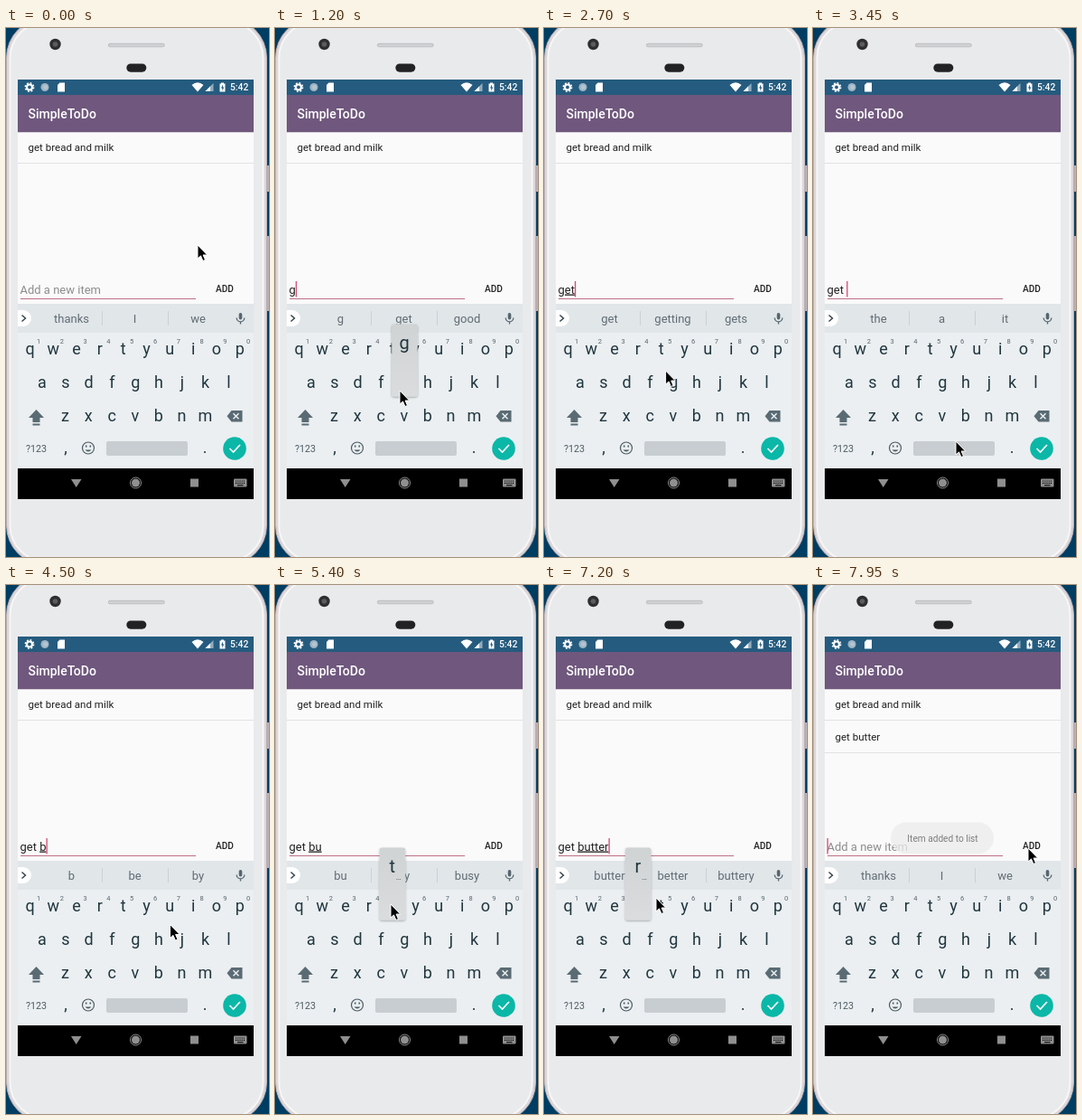
Recreate the animation shown at these times as an HTML page. Size 291 by 585 pixels, loop 8000 ms.

```html
<!DOCTYPE html>
<html lang="en">
<head>
<meta charset="utf-8">
<title>To-do list typing</title>
<style>
  html, body { margin: 0; height: 100%; overflow: hidden; background: #003d62; }
  svg { display: block; width: 100vw; height: 100vh; font-family: Roboto, sans-serif; }
  text { white-space: pre; }
  .mid { text-anchor: middle; }
  .item { font-size: 11.55px; fill: #222; }
  .field { font-size: 13px; }
  .key { font-size: 18px; fill: #20363f; text-anchor: middle; }
  .digit { font-size: 7.5px; fill: #56656c; text-anchor: middle; }
  #word { text-decoration: underline; }
</style>
</head>
<body>
<svg viewBox="0 0 291 585">
  <defs>
    <linearGradient id="popFill" x2="0" y2="1">
      <stop stop-color="#d0d3d4"/><stop offset="1" stop-color="#dadcdd"/>
    </linearGradient>
    <filter id="soft" x="-30%" y="-30%" width="160%" height="160%">
      <feDropShadow dx="0" dy="1" stdDeviation="1" flood-opacity=".35"/>
    </filter>
  </defs>

  <!-- phone body -->
  <rect width="291" height="585" fill="#003d62"/>
  <path d="M288 152h3v29h-3zM288 230h3v83h-3z" fill="#b9b0b5"/>
  <rect x=".5" y="-11" width="288" height="605" rx="44" fill="#dcd6d9" stroke="#b3abb0"/>
  <rect x="4.500" y="-7" width="280" height="597" rx="40" fill="#e9eaec" stroke="#f7f6f7" stroke-width="2"/>
  <circle cx="54.500" cy="18" r="6.200" fill="#2e2e30"/>
  <circle cx="54.500" cy="18" r="2.800" fill="#5c5c60"/>
  <rect x="113.300" y="17.300" width="62" height="3.500" rx="1.700" fill="#d2d2d5" stroke="#b0b0b4" stroke-width=".7"/>
  <rect x="133.300" y="39.500" width="22" height="9.200" rx="4.600" fill="#222224"/>

  <!-- status bar -->
  <rect x="13" y="57" width="261" height="464" fill="#fafafa"/>
  <rect x="13" y="57" width="261" height="17" fill="#255b7e"/>
  <g fill="#fff">
    <circle cx="26" cy="65.500" r="3" fill="none" stroke="#fff" stroke-width="2.200"/>
    <circle cx="26" cy="65.500" r="4.700" fill="none" stroke="#fff" stroke-width="1.500" stroke-dasharray="1.9 1.79"/>
    <circle cx="43" cy="65.500" r="4.500" fill="#9db4c3"/>
    <circle cx="43.500" cy="65.500" r="2.500" fill="#b4c6d1"/>
    <path d="M59.500 60.500H65V70.500H57V63z"/>
    <path d="M205.500 63Q212 57.500 218.500 63L212 70.500z"/>
    <path d="M229.500 61V70H220.500z" opacity=".5"/>
    <path d="M226 64.500V70H220.500z"/>
    <path d="M236.500 61.500H238V60.500H241V61.500H242.500V70.500H236.500z"/>
    <path d="M240 62.500L238 66.500H239.300V69.500L241.300 65.500H240z" fill="#255b7e"/>
    <text x="248" y="69" font-size="10.300" font-weight="500">5:42</text>
  </g>

  <!-- app -->
  <rect x="13" y="74" width="261" height="41" fill="#6f577d"/>
  <rect x="13" y="115" width="261" height="1" fill="#d6d0d8"/>
  <text x="24.500" y="100" font-size="14" font-weight="500" fill="#fff">SimpleToDo</text>
  <text class="item" x="24.500" y="136">get bread and milk</text>
  <path d="M13 149.500H274" stroke="#e2e2e2"/>
  <g id="added">
    <text class="item" x="24.500" y="171.500">get butter</text>
    <path d="M13 185.500H274" stroke="#e2e2e2"/>
  </g>
  <path d="M16 299.500H210" stroke="#bd6f84"/>
  <text id="hint" class="field" x="15.500" y="293.500" fill="#8d8d8d">Add a new item</text>
  <text id="entry" class="field" x="15.500" y="293.500" fill="#222"><tspan id="done"></tspan><tspan id="word"></tspan></text>
  <rect id="caret" y="280" width="1.300" height="17.500" fill="#d6486f"/>
  <text class="mid" x="242" y="291.500" font-size="10.150" font-weight="500" fill="#222">ADD</text>

  <!-- keyboard -->
  <rect x="13" y="305" width="261" height="182" fill="#ebeff1"/>
  <rect x="13" y="305" width="261" height="32" fill="#e1e6e9"/>
  <path d="M13 312H19A9 9 0 0 1 19 330H13z" fill="#fff"/>
  <path d="M17.500 317.500L21.500 321L17.500 324.500" fill="none" stroke="#37474f" stroke-width="1.500"/>
  <path d="M106.500 313V329M179.500 313V329" stroke="#cbd1d5"/>
  <g id="suggest" font-size="13" fill="#5f6c73">
    <text class="mid" x="72.500" y="326"></text>
    <text class="mid" x="142.500" y="326"></text>
    <text class="mid" x="212.500" y="326"></text>
  </g>
  <g stroke="#56666f" fill="none">
    <rect x="257.700" y="315" width="3.600" height="7.500" rx="1.800" fill="#56666f" stroke="none"/>
    <path d="M255.200 320.500a4.300 4.300 0 0 0 8.600 0M259.500 325V327.500" stroke-width="1.300"/>
  </g>
  <g id="keys"></g>
  <path d="M33.500 422L42 431H37.500V436H29.500V431H25zM29.500 437.500H37.500V439.500H29.500z" fill="#5a6b74"/>
  <path d="M249.500 423H261.500V435.500H249.500L244.500 429.200z" fill="#5a6b74"/>
  <path d="M251.500 426.200L257.500 432.200M257.500 426.200L251.500 432.200" stroke="#ebeff1" stroke-width="1.500"/>
  <text class="mid" x="33.500" y="468.500" font-size="10.700" fill="#4b5b63">?123</text>
  <text class="key" x="66" y="470">,</text>
  <text class="key" x="220" y="470">.</text>
  <g fill="none" stroke="#4b5b63" stroke-width="1.200">
    <circle cx="91" cy="464.500" r="6.500"/>
    <path d="M87.500 466.500Q91 470.500 94.500 466.500z" fill="#4b5b63" stroke="none"/>
    <path d="M88.700 461.500v2M93.300 461.500v2" stroke-width="1.600"/>
  </g>
  <rect x="111" y="457" width="90" height="16" rx="2" fill="#c8cdd1"/>
  <circle cx="253" cy="465" r="12.800" fill="#0bb7a7"/>
  <path d="M247.500 465L251.500 469L259 461" fill="none" stroke="#fff" stroke-width="1.700"/>

  <!-- navigation bar -->
  <rect x="13" y="487" width="261" height="34" fill="#000"/>
  <g fill="#8f8f8f">
    <path d="M72 499H83.500L77.700 508z"/>
    <circle cx="143.500" cy="503" r="6" fill="none" stroke="#8f8f8f"/>
    <circle cx="143.500" cy="503" r="4.500"/>
    <rect x="204" y="498.500" width="9" height="9"/>
    <rect x="252" y="498.500" width="14.500" height="9" rx="1"/>
    <path d="M254 501H265M254 503.300H265" stroke="#000" stroke-width="1.200" stroke-dasharray="1.2 1"/>
    <path d="M256 505.700H262.500" stroke="#000"/>
  </g>

  <g id="popup">
    <rect x="-14" width="28.500" height="80" rx="2.500" fill="url(#popFill)" filter="url(#soft)"/>
    <text class="key" y="27" style="font-size:20px"></text>
    <text class="mid" x="7" y="35" font-size="9" fill="#4b5b63">…</text>
  </g>
  <g id="toast">
    <rect x="86" y="262.500" width="114" height="34.500" rx="17" fill="#ececec"/>
    <text class="mid" x="143.500" y="284" font-size="10.150" fill="#555">Item added to list</text>
  </g>
  <path id="mouse" d="M0 0V15L3.500 11.900L5.900 17.500L8.500 16.400L6.100 11H10.700z" fill="#000" stroke="#fff"/>
</svg>

<script>
const LOOP = 8000, STEP = 150, ADDED = 7800;
const $ = id => document.getElementById(id);

// Keyboard rows: letters, first key centre, baseline
const rows = [['qwertyuiop', 26.5, 361], ['asdfghjkl', 40, 398], ['zxcvbnm', 65.5, 435]];
const keys = {};
let markup = '';
rows.forEach(([letters, x0, y], row) => [...letters].forEach((letter, i) => {
  const x = x0 + i * 25.8;
  keys[letter] = { x, y, digit: row === 0 };
  markup += `<text class="key" x="${x}" y="${y}">${letter}</text>`;
  if (row === 0) markup += `<text class="digit" x="${x + 9.5}" y="349">${(i + 1) % 10}</text>`;
}));
$('keys').innerHTML = markup;

// Key presses: time down, letter; the letter is entered one step later
const presses = [[1050, 'g'], [1800, 'e'], [2400, 't'], [3300, ' '], [3900, 'b'],
  [4650, 'u'], [5400, 't'], [5700, 't'], [6150, 'e'], [7050, 'r']];

const suggestions = {
  '': 'thanks I we', 'g': 'g get good', 'ge': 'ge get getting', 'get': 'get getting gets',
  'get ': 'the a it', 'get b': 'b be by', 'get bu': 'bu by busy', 'get but': 'but button butt',
  'get butt': 'butt button butter', 'get butte': 'butte Butte butter', 'get butter': 'butter better buttery'
};

// Pointer stops: time, x, y
const path = [[0, 212, 240], [150, 212, 240], [1050, 138, 402], [1200, 138, 401], [1350, 134, 398],
  [1800, 80, 357], [1950, 82, 356], [2100, 98, 353], [2400, 128, 356], [2550, 130, 357],
  [3300, 153, 467], [3450, 158, 457], [3900, 170, 431], [4050, 171, 429], [4350, 179, 394],
  [4650, 184, 357], [4800, 183, 356], [5250, 130, 354], [5400, 128, 353], [5850, 128, 355],
  [6150, 79, 356], [6450, 81, 355], [6600, 104, 355], [7050, 104, 355], [7200, 124, 346],
  [7500, 238, 291], [LOOP, 238, 291]];

function pointerAt(t) {
  const i = path.findIndex(p => p[0] > t);
  const [t0, x0, y0] = path[i - 1], [t1, x1, y1] = path[i];
  const k = (t - t0) / (t1 - t0);
  return [x0 + (x1 - x0) * k, y0 + (y1 - y0) * k];
}

const show = (id, on) => $(id).style.display = on ? '' : 'none';

function draw(time) {
  const t = Math.floor(time / STEP) * STEP;
  const added = t >= ADDED;
  const typed = presses.filter(p => t >= p[0] + STEP);
  const text = added ? '' : typed.map(p => p[1]).join('');
  const lastEdit = added ? ADDED : typed.length ? typed.at(-1)[0] + STEP : -600;

  const wordStart = text.lastIndexOf(' ') + 1;
  $('done').textContent = text.slice(0, wordStart);
  $('word').textContent = text.slice(wordStart);
  show('hint', !text);
  show('added', added);
  show('caret', (t - lastEdit) % 1000 < 500);
  $('caret').setAttribute('x', 15.5 + (text ? $('entry').getComputedTextLength() : 0));

  const words = suggestions[text].split(' ');
  [...$('suggest').children].forEach((el, i) => el.textContent = words[i]);

  const press = presses.findLast(p => t >= p[0] && t < p[0] + 2 * STEP);
  const key = press && keys[press[1]];
  show('popup', key);
  if (key) {
    const [, letter, more] = $('popup').children;
    $('popup').setAttribute('transform', `translate(${key.x} ${key.y - 70.5})`);
    letter.textContent = press[1];
    more.style.display = key.digit ? '' : 'none';
  }

  $('toast').style.opacity = t > ADDED ? .75 : 0;
  $('mouse').setAttribute('transform', `translate(${pointerAt(t)})`);
}

function tick(now) {
  draw(now % LOOP);
  requestAnimationFrame(tick);
}
tick(performance.now());
</script>
</body>
</html>
```
